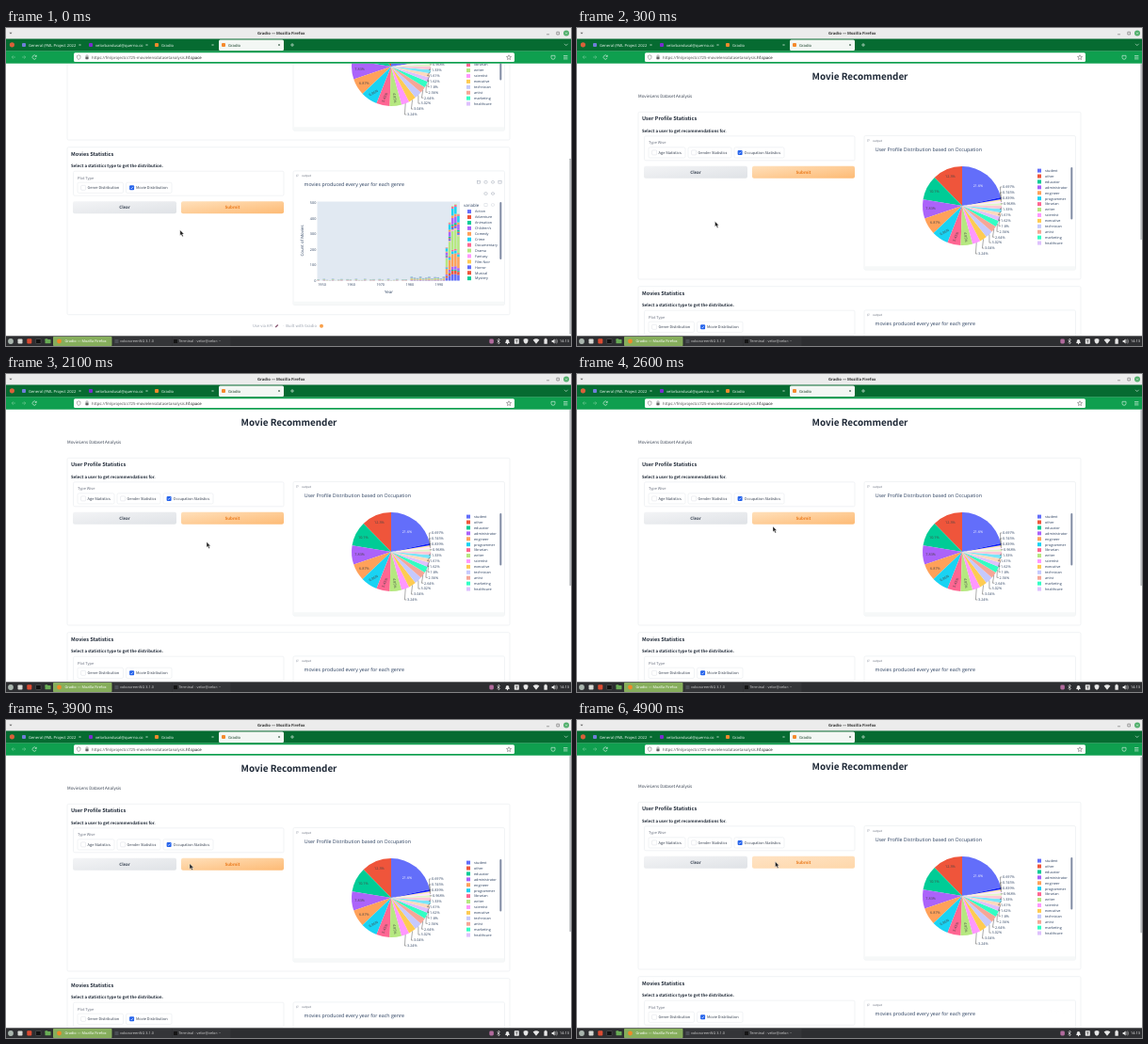
An HTML page for the animation above (5000 ms loop, 600 by 338 pixels).

```html
<!DOCTYPE html>
<html lang="en">
<head>
<meta charset="utf-8">
<title>Movie Recommender</title>
<style>
html, body { margin: 0; width: 100%; height: 100%; overflow: hidden; background: #fff; }
svg { display: block; width: 100%; height: 100%; }
text { text-rendering: geometricPrecision; white-space: pre; }
.ui { font-family: "Noto Sans CJK JP", "Noto Sans CJK SC", "Noto Sans CJK", sans-serif; }
.plot { font-family: "Open Sans", sans-serif; }
.sys { font-family: "Noto Sans", sans-serif; }
</style>
</head>
<body>
<svg id="stage" viewBox="0 0 600 338"></svg>
<script>
const LOOP = 5000, STEP = 100;
const INK = '#1f2937', GREY = '#6b7280', PLOT_INK = '#2a3f5f';
const BASE = ['#636efa', '#ef553b', '#00cc96', '#ab63fa', '#ffa15a',
  '#19d3f3', '#ff6692', '#b6e880', '#ff97ff', '#fecb52'];
const LIGHT = ['#c5c9fd', '#f6a697', '#33ffc4', '#dec0fd', '#ffd9bd',
  '#79e5f8', '#ffc7d7', '#e0f6c8', '#ffe4ff', '#fee7b0'];
const PIE_COLORS = [...BASE, ...LIGHT, '#1221f5'];
const SUBMIT = { x: 186, y: 147, w: 109, h: 13 };

const text = (x, y, s, size, cls, fill = INK, more = '') =>
  `<text x="${x}" y="${y}" font-size="${size}" class="${cls}" fill="${fill}" ${more}>${s}</text>`;
const rect = (x, y, w, h, fill, r = 0, more = '') =>
  `<rect x="${x}" y="${y}" width="${w}" height="${h}" rx="${r}" fill="${fill}" ${more}/>`;
const dot = (x, y, r, fill, more = '') => `<circle cx="${x}" cy="${y}" r="${r}" fill="${fill}" ${more}/>`;
const line = (d, stroke, w = .5) =>
  `<path d="${d}" fill="none" stroke="${stroke}" stroke-width="${w}"/>`;
const shape = (d, fill) => `<path d="${d}" fill="${fill}"/>`;
const frame = (x, y, w, h, r = 1.5) => rect(x, y, w, h, '#fff', r, 'stroke="#e3e6ea" stroke-width=".5"');
const BOLD = 'font-weight="700"', MID = 'text-anchor="middle"', END = 'text-anchor="end"';

function pill(x, y, w, label, on) {
  const box = on
    ? rect(x + 3.6, y + 3.1, 5, 5, '#2563eb', 1) +
      line(`M${x + 4.9} ${y + 5.7}l.9 .9 1.6-1.9`, '#fff', .6)
    : rect(x + 3.6, y + 3.1, 5, 5, '#fff', 1, 'stroke="#d1d5db" stroke-width=".4"');
  return frame(x, y, w, 11.2) + box + text(x + 10.6, y + 7.1, label, 3.94, 'ui', '#374151');
}

const button = (x, y, w, fill, label, ink) =>
  rect(x, y, w, SUBMIT.h, `url(#${fill})`, 2, `class="${fill}"`) +
  text(x + w / 2, y + 7.9, label, 4.45, 'ui', ink, `${BOLD} ${MID}`);

function panel(y, h, title, hint, label, pills) {
  return frame(65, y, 470, h) +
    text(69, y + 9, title, 5.55, 'ui', INK, BOLD) +
    text(69, y + 21.3, hint, 4.42, 'ui', INK, BOLD) +
    frame(71.5, y + 25.5, 223.5, 26) +
    text(76, y + 33.8, label, 3.94, 'ui', GREY) +
    pills.map(([x, w, s, on]) => pill(x, y + 37.5, w, s, on)).join('') +
    button(71, y + 57.5, 110, 'plain', 'Clear', '#374151') +
    button(SUBMIT.x, y + 57.5, SUBMIT.w, 'warm', 'Submit', '#ea7a1c') +
    frame(305, y + 25.2, 224.5, 142.6) +
    rect(305.3, y + 164, 223.9, 3.6, '#f6f8f8') +
    line(`M308.5 ${y + 31.3}v-2h2.2M308.5 ${y + 31.3}l2.2-1.2`, '#9ca3af', .4) +
    text(314, y + 31.6, 'output', 3.1, 'ui', GREY);
}

function legend(x, y, names, tint) {
  const colors = [...BASE, ...tint], pitch = 5.92;
  return names.map((n, i) => rect(x, y + i * pitch - 1.9, 4, 4, colors[i]) +
    text(x + 8, y + i * pitch + 1.4, n, 3.75, 'plot', PLOT_INK)).join('');
}

function pie() {
  const cx = 409, cy = 189, r = 42;
  const parts = [21.6, 12.3, 10.1, 7.83, 6.87, 6.86, 5.45, 4.85, 3.24, 3.04, 3.02,
    2.64, 2.56, 1.8, 1.62, 1.61, 1.33, .968, .839, .745, .697];
  const labelX = [426, 433, 440.5, 444, 448.5, 450.5, 450, 450, 452, 453, 452, 452, 452];
  const total = parts.reduce((a, b) => a + b);
  const at = (a, k) => [cx + Math.sin(a) * k, cy - Math.cos(a) * k];
  const turn = [0, 0, 0, 0, 0, -28, -66, 84];
  let out = '', top = '', a = parts[0] / total * 2 * Math.PI;
  parts.forEach((p, i) => {
    const b = a - p / total * 2 * Math.PI, m = (a + b) / 2;
    const [x0, y0] = at(a, r), [x1, y1] = at(b, r);
    out += shape(`M${cx} ${cy}L${x0} ${y0}A${r} ${r} 0 0 0 ${x1} ${y1}Z`, PIE_COLORS[i]);
    if (i < 8) {
      const [x, y] = at(m, i ? 33.5 : 27);
      top += text(0, 1.3, p + '%', 3.75, 'plot', i ? '#444' : '#fff',
        `${MID} transform="translate(${x} ${y}) rotate(${turn[i]})"`);
    } else {
      const k = i - 8, lx = labelX[k], ly = 240 - k * 5.92, [x, y] = at(m, r);
      top += line(`M${x} ${y}L${lx - 2.6} ${ly}h2`, '#444', .45) +
        text(lx, ly + 1.3, p + '%', 3.75, 'plot', PLOT_INK);
    }
    a = b;
  });
  const names = ['student', 'other', 'educator', 'administrator', 'engineer', 'programmer', 'librarian',
    'writer', 'scientist', 'executive', 'technician', 'artist', 'marketing', 'healthcare'];
  return text(316.7, 131, 'User Profile Distribution based on Occupation', 5.31, 'plot', PLOT_INK) +
    out + top + legend(489, 151.5, names, LIGHT) + rect(524.3, 148, 2, 55.5, '#808ba4', 1);
}

function bars() {
  const x0 = 330.5, base = 416.5, unit = .165;
  const share = [9, 5, 1.5, 4.5, 18, 4, 2, 27, 1, 1, 3, 2, 2.5, 9, 3.5, 10, 2.5, 1];
  const sum = share.reduce((a, b) => a + b);
  const late = { 1993: 215, 1994: 375, 1995: 480, 1996: 492, 1997: 430 };
  let out = rect(x0, 332.5, 151.5, 84, '#e1e9f2');
  for (let v = 0; v <= 500; v += 100) {
    out += text(x0 - 1.2, base - v * unit + 1.2, v, 3.75, 'plot', PLOT_INK, END);
  }
  for (let d = 0; d < 5; d++) {
    out += text(335.5 + d * 31.1, 422, 1950 + d * 10, 3.75, 'plot', PLOT_INK, MID);
  }
  for (let year = 1949; year <= 1997; year++) {
    const x = 480.4 - (1997 - year) * 3.1;
    const n = late[year] || (year > 1980 ? 20 : 6) + 6 * Math.sin(year * 2.3);
    let y = base;
    share.forEach((s, i) => {
      const h = n * s / sum * unit;
      y -= h;
      out += rect(x - 1.25, y, 2.5, h, BASE[i % 10]);
    });
  }
  const names = ['Action', 'Adventure', 'Animation', "Children's", 'Comedy', 'Crime', 'Documentary',
    'Drama', 'Fantasy', 'Film-Noir', 'Horror', 'Musical', 'Mystery'];
  const tools = [[502, 311.8], [509.5, 311.8], [517, 311.8], [524.5, 311.8],
    [509.5, 324], [517, 324], [509.5, 336], [517, 336]];
  return text(316.5, 316.4, 'movies produced every year for each genre', 5.31, 'plot', PLOT_INK) + out +
    text(406.5, 430.4, 'Year', 4.375, 'plot', PLOT_INK, MID) +
    text(0, 0, 'Count of Movies', 4.375, 'plot', PLOT_INK, `${MID} transform="translate(315.8 374) rotate(-90)"`) +
    text(486, 338, 'variable', 4.375, 'plot', PLOT_INK) + legend(490, 343, names, BASE) +
    rect(524.3, 333, 2, 61, '#808ba4', 1) +
    `<g id="tools">${tools.map(([x, y], i) => rect(x - 1.6, y - 1.3, 3.2, 2.6, 'none', i % 3,
      `stroke="${i < 6 ? '#a9b0bd' : '#d5d9e0'}" stroke-width=".6"`)).join('')}</g>`;
}

function page() {
  return text(300.5, 55.4, 'Movie Recommender', 9.85, 'ui', INK, `${BOLD} ${MID}`) +
    text(65, 74.2, 'MovieLens Dataset Analysis', 4.5, 'ui', '#374151') +
    panel(89.3, 177.7, 'User Profile Statistics', 'Select a user to get recommendations for.', 'Type Wise',
      [[76, 39, 'Age Statistics'], [118, 46, 'Gender Statistics'], [167, 53, 'Occupation Statistics', true]]) +
    panel(274.7, 178, 'Movies Statistics', 'Select a statistics type to get the distribution.', 'Plot Type',
      [[76, 48.5, 'Genre Distribution'], [127.5, 48.5, 'Movie Distribution', true]]) +
    pie() + bars() +
    text(262, 466.3, 'Use via API', 4.2, 'ui', '#9ca3af') +
    line('M286.2 466l2.6-2.6', '#8b5a74', 1.4) +
    text(293, 466.3, '·  Built with Gradio', 4.2, 'ui', '#9ca3af') +
    dot(335, 464.8, 2, '#f9a04b');
}

function tab(x, icon, label, active) {
  const ink = active ? '#153d25' : '#e4f3e9';
  return (active ? rect(226, 12.5, 69, 11.5, '#f3f7f4', 1.5) : '') +
    rect(x, 16, 4, 4, icon, 1) +
    text(x + 7, 19.7, label, 4.1, 'sys', ink);
}

function browser() {
  const cross = (x, ink) => line(`M${x - 1} 17l2 2m0-2l-2 2`, ink, .5);
  return rect(0, 0, 600, 12, '#ececec') +
    text(267, 7.4, 'Gradio — Mozilla Firefox', 4.17, 'sys', '#333', BOLD) +
    shape('M3.5 4.8h3l-1.5 1.7z', '#666') +
    line('M574 6.8h3M584.8 4.2h2.6v2.8h-2.6z', '#666', .6) +
    dot(595, 5.6, 3, '#4fae6a') + line('M594 4.6l2 2m0-2l-2 2', '#fff', .5) +
    rect(0, 11.5, 600, 13.2, '#066b31') + rect(0, 24.5, 600, 13.2, '#0f9f4f') +
    dot(6.4, 17.8, 2.6, '#d9603a') +
    tab(17, '#6f7ed8', 'General (FML Project 2022') +
    tab(88, '#7a2bd0', 'velorbandusal@querno.com') +
    tab(158, '#f58a2c', 'Gradio') + tab(229, '#f58a2c', 'Gradio', true) +
    rect(74, 13, 10, 10, '#066b31') + rect(145.5, 13, 8, 10, '#066b31') +
    cross(78.5, '#cfe6d7') + cross(149.5, '#cfe6d7') + cross(219.5, '#cfe6d7') + cross(290, '#153d25') +
    line('M302 18h4m-2-2v4M593 16.8l1.8 1.8 1.8-1.8', '#e4f3e9', .6) +
    line('M10 31H6.2l1.7-1.7M6.2 31l1.7 1.7M17 31h3.8l-1.7-1.7M20.8 31l-1.7 1.7', '#78c998', .6) +
    line('M32 30a2.1 2.1 0 1 0 .1 1.9M32.3 28.8v1.6h-1.6', '#e4f3e9', .6) +
    rect(72, 26.3, 468, 9.8, '#fff', 1.5) +
    line('M77.2 28.8l1.8.7v1.8q-.3 1.6-1.8 2.2q-1.5-.6-1.8-2.2v-1.8z', '#666', .5) +
    rect(84.4, 30.6, 3.2, 2.6, '#666', .4) + line('M85 30.7v-1a1 1 0 0 1 2 0v1', '#666', .5) +
    text(91, 32.6, 'https://fmlprojectcs725-movielensdatasetanalysis.<tspan fill="#111">hf.space</tspan>',
      4.25, 'sys', '#555') +
    line('M534 28.7l.7 1.6 1.8.2-1.4 1.2.4 1.8-1.5-.9-1.5.9.4-1.8-1.4-1.2 1.8-.2z', '#555', .5) +
    line('M579 29.3h4v2a2 2 0 0 1-4 0zM592 29.5h4.4M592 31.2h4.4M592 32.9h4.4', '#e4f3e9', .6);
}

function tray() {
  const ink = '#e8e8e8';
  return rect(513.3, 330.5, 4.6, 5, '#b06a9c', 1.4) +
    line('M521.5 331.6l3 2.8-1.5 1.4v-5.6l1.5 1.4-3 2.8', ink, .6) +
    shape('M530 335q.8-.8.8-2.4a1.7 1.7 0 0 1 3.4 0q0 1.6.8 2.4z', ink) + dot(532.5, 335.5, .7, ink) +
    rect(539.8, 330.3, 5, 5.4, ink, .6) + line('M541 332h2.6m-1.3 0v2.6', '#333', .6) +
    shape('M552 330l2.4.8v2.2q-.4 2-2.4 2.8q-2-.8-2.4-2.8v-2.2z', ink) +
    shape('M559.6 331.6q3.4-2.6 6.8 0l-3.4 4.2z', ink) +
    rect(571.4, 330.4, 3.4, 5.4, ink, .6) + rect(572.3, 329.8, 1.6, 1, ink) +
    shape('M579.6 332h1.2l1.8-1.6v5.2l-1.8-1.6h-1.2z', ink) +
    line('M583.5 331.4q1 1.6 0 3.2M584.7 330.6q1.5 2.4 0 4.8', ink, .5) +
    text(588, 334.4, '14:13', 3.85, 'sys', '#f0f0f0');
}

function taskbar() {
  const task = (x, icon, label) => rect(x, 328, 62, 10, '#343538', .8) +
    rect(x + 1.5, 331, 4, 4, icon, .5) + text(x + 7, 334.4, label, 3.85, 'sys', '#c9c9c9');
  return rect(0, 327.3, 600, 10.7, '#2d2e31') +
    dot(5, 333, 2.9, '#a9b5ad') + rect(12.5, 330.5, 5, 5, '#d7d9d5', .8) +
    rect(22.3, 330.3, 5, 5.3, '#dc4b32', 1) + rect(31.6, 330.5, 5.5, 5, '#111', .6, 'stroke="#777" stroke-width=".4"') +
    rect(41.5, 331, 6, 4.3, '#69ad56', .6) + rect(41.5, 330.2, 2.8, 2, '#69ad56', .4) +
    rect(50, 328, 62.5, 10, '#86ae5c', .8) + dot(56.5, 333, 2.4, '#f08a28') +
    text(62.5, 334.4, 'Gradio — Mozilla Firefox', 3.85, 'sys', '#fff') +
    task(114, '#4b4e55', 'vokoscreenNG 3.1.0') +
    task(176.5, '#151515', 'Terminal - velor@velor: ~') + tray();
}

const gradient = (id, from, to) => `<linearGradient id="${id}" x2="1" y2="1">
  <stop stop-color="${from}"/><stop offset="1" stop-color="${to}"/></linearGradient>`;

document.getElementById('stage').innerHTML = `
  <defs>
    ${gradient('plain', '#f3f4f6', '#dfe2e6')}
    ${gradient('warm', '#ffe0bb', '#fdba74')}
    ${gradient('hover', '#ffe3c4', '#fed7aa')}
    <clipPath id="view"><rect y="37.5" width="600" height="290"/></clipPath>
  </defs>
  <rect width="600" height="338" fill="#fff"/>
  <g clip-path="url(#view)"><g id="page">${page()}</g>
    <rect id="thumb" x="598.5" width="1.3" height="187" rx=".6" fill="#a6a9ae"/></g>
  ${browser()}${taskbar()}
  <path id="mouse" d="M0 0V5.8L1.3 4.6 2.4 6.9 3.5 6.4 2.4 4.2H4.2Z" fill="#222" stroke="#fff" stroke-width=".35"/>`;

// Rows: time, then values
const SCROLL = [[0, 148], [100, 104], [200, 24], [300, 0], [4800, 0], [4900, 2]];
const MOUSE = [[0, 184.8, 214.8], [300, 146.5, 205.5], [600, 118, 150], [800, 118, 150], [1200, 49, 41.5],
  [1400, 62, 58], [1800, 200, 170], [2000, 211, 177], [2100, 213, 178.5], [2600, 208, 162],
  [3100, 201, 146], [3800, 196, 146], [3900, 195, 152.7], [4400, 203, 150], [4900, 210.5, 150.6]];

function sample(rows, t) {
  const i = rows.findIndex(r => r[0] > t);
  if (i < 0) return rows[rows.length - 1].slice(1);
  const a = rows[i - 1], b = rows[i], k = (t - a[0]) / (b[0] - a[0]);
  return a.slice(1).map((v, j) => v + (b[j + 1] - v) * k);
}

// The button reacts one step after the pointer arrives
function hovered(t) {
  const [x, y] = sample(MOUSE, Math.max(0, t - STEP));
  return t > 3000 && x > SUBMIT.x && x < SUBMIT.x + SUBMIT.w && y > SUBMIT.y && y < SUBMIT.y + SUBMIT.h;
}

const [pageEl, thumb, mouse, tools] = ['page', 'thumb', 'mouse', 'tools'].map(id => document.getElementById(id));
const submit = document.querySelector('.warm');
function draw(now) {
  const t = Math.floor(now % LOOP / STEP) * STEP;
  const [s] = sample(SCROLL, t), [x, y] = sample(MOUSE, t);
  pageEl.setAttribute('transform', `translate(0 ${-s})`);
  thumb.setAttribute('y', 38 + s * .68);
  tools.setAttribute('opacity', s / 148);
  submit.setAttribute('fill', hovered(t) ? 'url(#hover)' : 'url(#warm)');
  mouse.setAttribute('transform', `translate(${x} ${y})`);
}
const start = performance.now();
function tick() {
  draw(performance.now() - start);
  requestAnimationFrame(tick);
}
tick();
</script>
</body>
</html>
```
